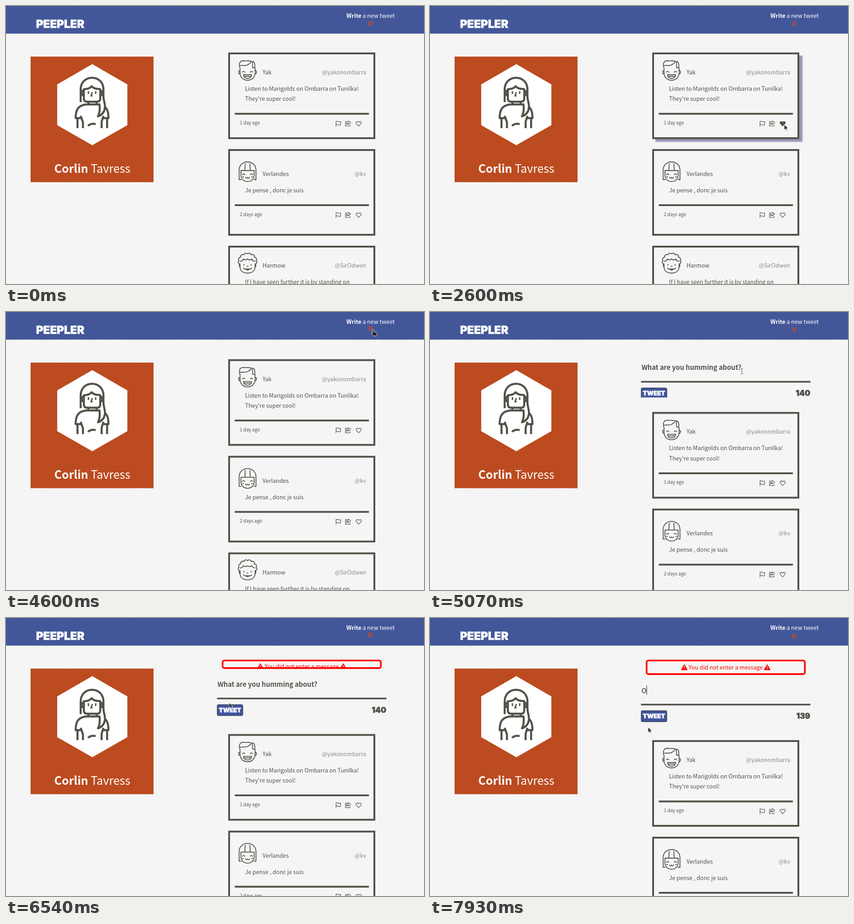
An HTML page that plays this animation: 918 by 610 pixels, repeating every 8000 ms.

```html
<!DOCTYPE html>
<html lang="en">
<head>
<meta charset="utf-8">
<title>Humming feed</title>
<style>
html, body { margin: 0; width: 100%; height: 100%; overflow: hidden; background: #f5f5f5; }
svg { display: block; width: 918px; height: 610px; }
text { font: 12.5px "Noto Sans CJK JP", "Noto Sans CJK SC", "Noto Sans CJK", "Open Sans", sans-serif; fill: #545149; white-space: pre; }
.bold { font-weight: 600; }
.small { font-size: 10px; }
.handle { fill: #868b93; text-anchor: end; }
.white { fill: #fff; }
.block { font-family: Inter, sans-serif; font-weight: 900; stroke-width: .6; }
.line { fill: none; stroke: #545149; stroke-width: 1.8; stroke-linecap: round; stroke-linejoin: round; }
.icon { fill: transparent; stroke: #545149; stroke-width: 1.2; stroke-linejoin: round; }
.icon.on { fill: #545149; }
.pointer { fill: #26262b; stroke: #fff; stroke-width: .8; }
</style>
</head>
<body>
<svg id="stage" viewBox="0 0 918 610"></svg>
<script>
const INK = '#545149', PAPER = '#f5f5f5', BLUE = '#4056a0';
const LOOP = 8000;

const AVATARS = {
  boy: `M-16.5-13V-4C-16.5 7-9 13 0 13S16.5 7 16.5-4V-13
    M-16.5-13C-20-24-17-30-9-30C-2-29 5-31 9-28C15-29 16.500-26 16-13
    M-17-19C-10-21-4-17 2-22Q6-24 9-28M11-26V-15H16
    M-16.5-8q-4 0-3 4q1 4 3 3M16.5-8q4 0 3 4q-1 4-3 3
    M-11-5q2.500-3 5 0M6-5q2.500-3 5 0
    M-9 1H9Q8 9 0 9T-9 1ZM-6 4.500H6`,
  girl: `M-14.500 8H-18.5V-13C-18.5-37 18.5-37 18.5-13V8H14.500
    M-14.5-12V-2C-14.5 17 14.5 17 14.5-2V-12
    M-14.5-12H14.5M-5-27L-6-12M5-27L6-12
    M-11-3q2.5-3 5 0M6-3q2.5-3 5 0
    M-4.5 3q2 4 4.5 0q2.5 4 4.5 0M-11 2h2M9 2h2`,
  curls: `M-16.5-8V-2C-16.5 8-9 12 0 12S16.5 8 16.5-2V-8
    M-17-8${[[-19, -16], [-15, -23], [-8, -28], [0, -30], [8, -28], [15, -23], [19, -16], [17, -8]]
      .map(p => 'A4.6 4.6 0 0 1 ' + p).join('')}
    M-16.5-14q6 0 7-5q5 4 9.500 0q4.500 4 9.500 0q1 5 7 5
    M-17-8q-3 3 1 8M17-8q3 3-1 8
    M-8-7v2M8-7v2M-1-3h2M-9 1q1 2 3 2H6q2 0 3-2M-4 3q4 5 8 0`
};

const PERSON = `M164 211V183C164 149 214 149 214 183V198C214 210 219 215 217 225C215 236 208 240 202 242
  C206 234 207 226 205 214
  M171 181V203Q171 210 178 210H200Q207 210 207 203V182
  M170 183Q184 182 188 176Q194 183 208 182
  M170 186q-5 1-4 6q1 4 4 4M208 186q4 1 4 6q-1 4-4 4
  M181 210V216H199V210M182 216H176C158 218 153 228 153 246H164M199 216H205
  M157 247V268M169 268V255L164 241
  M217 221Q225 227 225 246H213M222 247V268M210 268V254L214 241
  M180 263Q186 257 197 259`;

const ICONS = {
  flag: 'M724.8 264.5V252.5M724.8 253.5q2.5-1.5 5 0t5 0v7q-2.5 1.5-5 0t-5 0',
  share: 'M750 253.5h-4.5v10h10v-3M752 252l5 4l-5 4v-2.5q-3 0-4 3q-.5-6 4-6z',
  heart: 'M774.5 263.5l-4.7-4.8c-3.2-3.4 1-7.6 4.7-3.6c3.7-4 7.9 .2 4.7 3.6z'
};

const POSTS = [
  { top: 102.5, name: 47.5, rule: 134, avatar: 'boy', who: 'Yak', handle: '@yakonombarra', when: '1 day ago',
    lines: ['Listen to Marigolds on Ombarra on Tunilka!', "They're super cool!"] },
  { top: 314.5, name: 58.5, rule: 122.5, avatar: 'girl', who: 'Verlandes', handle: '@kv', when: '2 days ago',
    lines: ['Je pense , donc je suis'] },
  { top: 526.5, name: 47.5, rule: 134, avatar: 'curls', who: 'Harmow', handle: '@SirOdwen', when: '3 days ago',
    lines: ['If I have seen further it is by standing on'] }
];

const label = (x, y, str, cls = '', extra = '') => `<text x="${x}" y="${y}" class="${cls}" ${extra}>${str}</text>`;

function post(p, i) {
  const base = p.top + p.name, rule = p.top + p.rule;
  const icons = Object.keys(ICONS).map(k => `<path class="icon" id="${k}${i}" d="${ICONS[k]}"/>`).join('');
  return `<rect x="490" y="${p.top + 1.5}" width="319" height="186" fill="${PAPER}" stroke="${INK}" stroke-width="4"/>
    <path class="line" transform="translate(530.5 ${base})" d="${AVATARS[p.avatar]}"/>
    ${label(563.5, base, p.who)}${label(791, base, p.handle, 'handle')}
    ${p.lines.map((s, n) => label(525, base + 36 + n * 22.3, s)).join('')}
    <rect x="502.5" y="${rule - 2}" width="294.5" height="4" fill="${INK}"/>
    ${label(513.5, rule + 23.5, p.when, 'small')}
    <g transform="translate(0 ${rule - 236.5})">${icons}</g>`;
}

function grain(id, rgb) {
  return `<filter id="${id}" x="0" y="0" width="1" height="1" color-interpolation-filters="sRGB">
    <feTurbulence type="fractalNoise" baseFrequency=".5" numOctaves="3" seed="4"/>
    <feColorMatrix values="0 0 0 0 ${rgb[0]} 0 0 0 0 ${rgb[1]} 0 0 0 0 ${rgb[2]} 1.2 0 0 0 -.38"/></filter>`;
}

const textured = (box, fill, id) => `<rect ${box} fill="${fill}"/><rect ${box} filter="url(#${id})"/>`;
const warning = x => `<path d="M${x} 103l6 10.5h-12z" fill="red" stroke="red" stroke-width="2" stroke-linejoin="round"/>
  <path d="M${x} 105.5v4M${x} 111v1.6" stroke="${PAPER}" stroke-width="1.6"/>`;

document.getElementById('stage').innerHTML = `
  <defs>
    ${grain('rust', [.46, .36, .26])}${grain('denim', [.29, .34, .5])}
    <filter id="soft" x="-.1" y="-.1" width="1.2" height="1.2"><feGaussianBlur stdDeviation="1.5"/></filter>
    <clipPath id="formClip"><rect id="formBox" x="440" y="60" width="420" height="0"/></clipPath>
    <clipPath id="alertClip"><rect id="alertBox" x="474" y="92" width="351" height="0"/></clipPath>
  </defs>
  <rect width="918" height="610" fill="${PAPER}"/>
  ${textured('width="918" height="60.5"', BLUE, 'denim')}
  ${label(66, 48, 'PEEPLER', 'block white', 'style="font-size:24.2px" stroke="#fff"')}
  <text x="747.5" y="26" class="white"><tspan class="bold">Write</tspan> a new tweet</text>
  <path id="chevron" d="M-4.5-4.5L0 0L4.5-4.5M-4.5 .5L0 5L4.5 .5" fill="none" stroke="#d94a1c" stroke-width="1.7" stroke-linecap="round" stroke-linejoin="round"/>
  ${textured('x="54" y="111" width="270" height="275.5"', '#d04616', 'rust')}
  <path d="M189.5 127.5L266.5 172V261.5L189.5 305.5L112.5 261.5V172Z" fill="#fff"/>
  <path class="line" style="stroke-width:4.5;stroke-linecap:butt" d="${PERSON}"/>
  <path d="M181 187v6M197 187v6M189.5 189l-2.5 8h3" fill="none" stroke="${INK}" stroke-width="3"/>
  <text x="189.5" y="366" class="white" text-anchor="middle" style="font-size:25px"><tspan class="bold">Corlin</tspan><tspan font-weight="300"> Tavress</tspan></text>
  <g id="alert">
    <g clip-path="url(#alertClip)"><g id="alertText">${warning(558.5)}${label(649.5, 113, 'You did not enter a message', '', 'text-anchor="middle" style="fill:red"')}${warning(740.5)}</g></g>
    <rect id="alertEdge" x="475.7" y="93.2" width="347.6" height="30" rx="4" fill="none" stroke="red" stroke-width="3.6"/>
  </g>
  <g clip-path="url(#formClip)"><g id="form">
    ${label(464.5, 130, 'What are you humming about?', 'bold', 'id="hint" style="font-size:14.6px"')}
    ${label(464.5, 164.5 - 34, 'O', '', 'id="typed" style="font-size:15px;fill:#222"')}
    <rect id="caret" y="114" width="1" height="21" fill="#222"/>
    <rect x="463.5" y="154.2" width="372" height="3.6" fill="${INK}"/>
    <rect id="button" x="464" y="169.5" width="56" height="24" rx="3" fill="${BLUE}"/>
    ${label(492, 186, 'TWEET', 'block white', 'text-anchor="middle" style="font-size:13.3px" stroke="#fff"')}
    ${label(835, 187, '140', 'block', `id="count" text-anchor="end" style="font-size:17px" stroke="${INK}"`)}
  </g></g>
  <g id="feed">
    <rect id="shadow" x="495" y="109" width="323" height="189" fill="#9394b4" filter="url(#soft)"/>
    ${POSTS.map(post).join('')}
  </g>
  <g id="cursor">
    <circle id="ripple" cx="1" cy="5" r="8.5" fill="#e8dc30" opacity=".75"/>
    <path id="arrow" class="pointer" d="M0 0V12L2.8 9.4L4.8 13.5L6.6 12.7L4.7 8.7H8.5Z"/>
    <path id="hand" class="pointer" d="M-1.5 1q1.5-2 3 0v4.5l6 1.5q2 .6 1.5 3l-1 4.5h-7l-4.5-6q0-2 2 0z"/>
    <path id="beam" d="M-2.5-6q2.5 0 2.5 1.5q0-1.5 2.5-1.5M0-5V5M-2.5 6q2.5 0 2.5-1.5q0 1.5 2.5 1.5" fill="none" stroke="${INK}"/>
  </g>`;

const el = {};
document.querySelectorAll('#stage [id]').forEach(n => el[n.id] = n);
const set = (id, attr, v) => el[id].setAttribute(attr, v);
const show = (id, on) => set(id, 'visibility', on ? 'inherit' : 'hidden');
const move = (id, x, y) => set(id, 'transform', `translate(${x} ${y})`);
const within = (v, a, b) => v >= a && v < b;
const swing = (t, start, span) => .5 - .5 * Math.cos(Math.PI * Math.min(1, Math.max(0, (t - start) / span)));

// Pointer stops: time, x, y
const STOPS = [
  [200, 806, 32], [520, 785, 115], [900, 733, 262], [1450, 731, 263], [1800, 750, 262], [2100, 752, 261],
  [2450, 778, 260], [2750, 778, 260], [3250, 758, 150], [3550, 757, 148], [4000, 795, 95], [4380, 806, 38],
  [4620, 806, 38], [5060, 685, 130], [5350, 665, 134], [5900, 491, 183], [6180, 490, 183], [6300, 490, 186],
  [6940, 490, 186], [7180, 491, 162], [7320, 491, 162], [7680, 479, 239.5], [8000, 479, 239.5]
];

function pointer(t) {
  let i = 1;
  while (i < STOPS.length - 1 && t > STOPS[i][0]) i++;
  const [t0, x0, y0] = STOPS[i - 1], [t1, x1, y1] = STOPS[i];
  const k = swing(t, t0, t1 - t0);
  return [x0 + (x1 - x0) * k, y0 + (y1 - y0) * k];
}

function draw(t) {
  const open = swing(t, 4555, 658), warn = swing(t, 6200, 600);
  const drop = 34 * warn;

  move('chevron', 800, 38.3 - 2.7 * Math.cos(2 * Math.PI * (t - 1950) / 2500));
  move('feed', 0, 132 * open + drop);
  move('form', 0, -26 * (1 - open) + drop);
  show('form', open > 0);
  set('formBox', 'height', 27 + 113 * open + drop);

  const h = Math.max(7, 33.5 * warn);
  show('alert', warn > 0);
  set('alertEdge', 'height', h - 3.6);
  set('alertBox', 'height', h - 3);
  move('alertText', 0, -6 * (1 - warn));

  const typed = t >= 7860;
  show('hint', !typed);
  show('typed', typed);
  show('caret', t >= 7260);
  set('caret', 'x', typed ? 475.5 : 465);
  el.count.textContent = typed ? '139' : '140';

  const pressed = within(t, 6090, 6240);
  set('button', 'stroke', pressed ? '#111' : '#3a3a48');
  set('button', 'stroke-width', pressed ? 2 : 1.4);

  const [x, y] = pointer(t);
  const hand = within(t, 4300, 4690) || within(t, 5820, 6260);
  const beam = within(t, 4950, 5480) || within(t, 7080, 7420);
  show('cursor', t >= 200);
  move('cursor', x, y);
  show('hand', hand);
  show('beam', beam);
  show('arrow', !hand && !beam);
  show('ripple', pressed || within(t, 4470, 4570));

  const inside = t >= 200 && open === 0 && within(x, 488, 811) && within(y, 103, 292);
  const onIcon = (a, b) => inside && within(y, 250, 275) && within(x, a, b);
  show('shadow', inside);
  el.flag0.classList.toggle('on', onIcon(722, 738));
  el.share0.classList.toggle('on', onIcon(744, 759));
  el.heart0.classList.toggle('on', onIcon(768, 783));
}

const begin = performance.now();
function tick() {
  draw((performance.now() - begin) % LOOP);
  requestAnimationFrame(tick);
}
tick();
</script>
</body>
</html>
```
